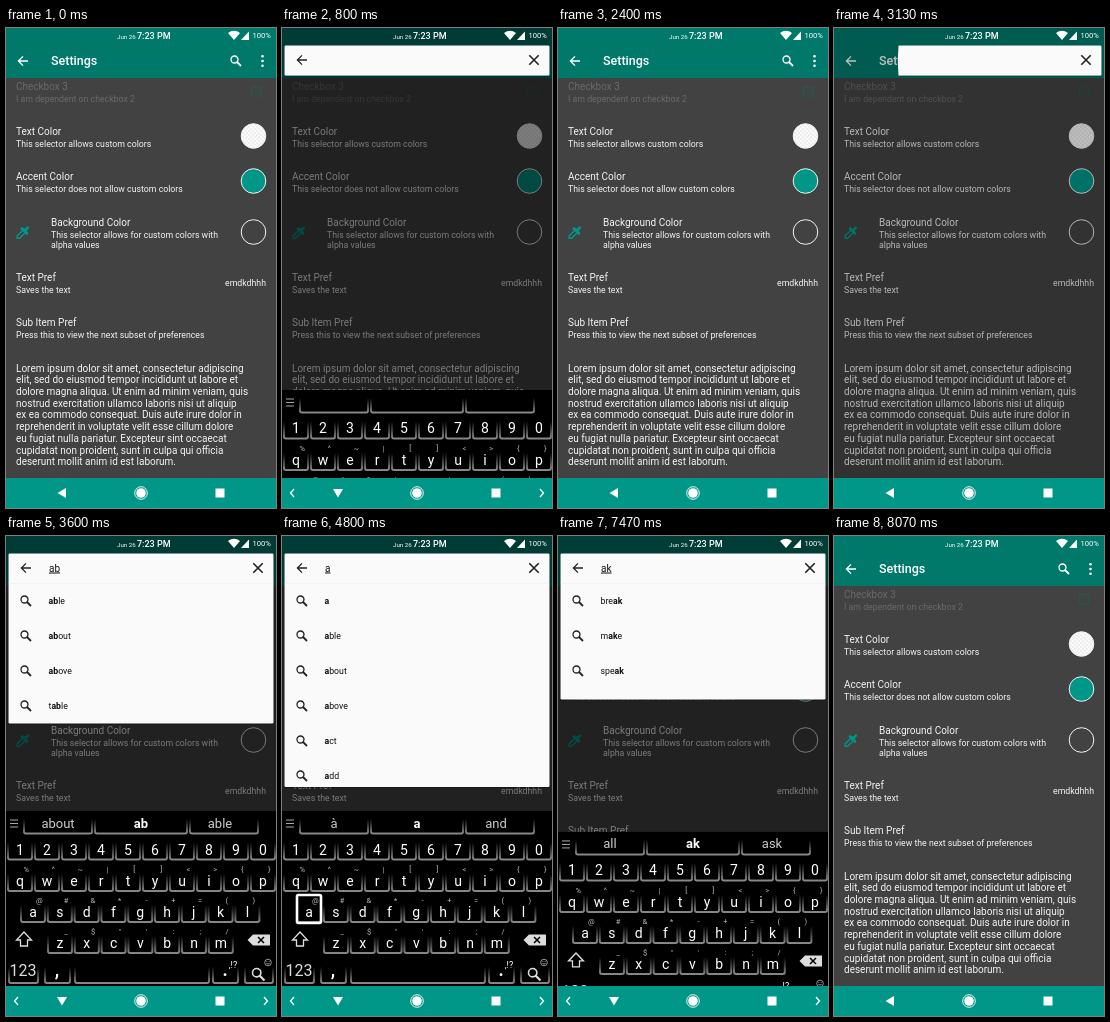
An HTML page that plays this animation: 270x480 px, repeating every 8740 ms.

```html
<!DOCTYPE html>
<html lang="en">
<head>
<meta charset="utf-8">
<title>Settings search</title>
<style>
html, body { margin: 0; width: 100%; height: 100%; overflow: hidden; background: #424242; }
svg { display: block; width: 100%; height: 100%; font-family: Roboto, sans-serif; }
text { white-space: pre; }
.line { fill: none; stroke: currentColor; stroke-width: 1.3; }
</style>
</head>
<body>
<svg id="stage" viewBox="0 0 270 480"></svg>
<script>
const LOOP = 8740, TOP = 17.5, BAR = 30, ROW = 35, MAX_H = 233.5;
const WORDS = ['a', 'able', 'about', 'above', 'act', 'add', 'break', 'make', 'speak', 'table', 'take'];
const HINTS = { '': ['', '', ''], a: ['à', 'a', 'and'], ab: ['about', 'ab', 'able'], aa: ['as', 'aa', 'a'], ak: ['all', 'ak', 'ask'] };
const EDITS = [[1130, 'a'], [1400, 'ab'], [4070, 'a'], [4930, 'aa'], [5600, 'a'], [6470, 'ak']];
const PRESSES = [['a', 1000, 1130], ['b', 1270, 1400], ['a', 4800, 4930], ['k', 6330, 6470]];
const LOREM = ['Lorem ipsum dolor sit amet, consectetur adipiscing', 'elit, sed do eiusmod tempor incididunt ut labore et',
  'dolore magna aliqua. Ut enim ad minim veniam, quis', 'nostrud exercitation ullamco laboris nisi ut aliquip',
  'ex ea commodo consequat. Duis aute irure dolor in', 'reprehenderit in voluptate velit esse cillum dolore',
  'eu fugiat nulla pariatur. Excepteur sint occaecat', 'cupidatat non proident, sunt in culpa qui officia', 'deserunt mollit anim id est laborum.'];

// markup helpers
const text = (x, y, size, str, more = '') => `<text x="${x}" y="${y}" font-size="${size}" ${more}>${str}</text>`;
const rect = (x, y, w, h, fill, more = '') => `<rect x="${x}" y="${y}" width="${w}" height="${h}" fill="${fill}" ${more}/>`;
const path = (d, more = 'class="line"') => `<path d="${d}" ${more}/>`;
const at = (x, y, body, more = '') => `<g transform="translate(${x} ${y})" ${more}>${body}</g>`;
const esc = s => s.replace(/&/g, '&amp;').replace(/</g, '&lt;');
const mid = 'text-anchor="middle"';
const lens = '<circle class="line" cx="-1.5" cy="-1.5" r="3.5"/>' + path('M1 1 5 5', 'class="line" style="stroke-width:1.8"');
const arrow = path('M5 0H-4M0 -4.6 -4.6 0 0 4.6');
const pref = (x, y, title, ...subs) => text(x, y, 10, title) + subs.map((s, i) => text(x, y + 12 + i * 10.2, 8.75, s)).join('');

function settings() {
  const dot = (y, fill) => `<circle cx="247.5" cy="${y}" r="12.3" fill="${fill}" stroke="#f2f2f2"/>`;
  return rect(0, 0, 270, 480, '#424242') +
    `<g fill="#6a6a6a">${pref(10, 62, 'Checkbox 3', 'I am dependent on checkbox 2')}</g>` +
    rect(245.5, 58.5, 9.5, 9.5, 'none', 'stroke="#27584f" stroke-width="1.2"') +
    '<g fill="#f4f4f4">' +
    pref(10, 107, 'Text Color', 'This selector allows custom colors') +
    pref(10, 152, 'Accent Color', 'This selector does not allow custom colors') +
    pref(45, 197.5, 'Background Color', 'This selector allows for custom colors with', 'alpha values') +
    pref(10, 253, 'Text Pref', 'Saves the text') +
    pref(10, 298, 'Sub Item Pref', 'Press this to view the next subset of preferences') +
    text(260, 258, 8.75, 'emdkdhhh', 'text-anchor="end"') +
    LOREM.map((s, i) => text(10, 343.5 + i * 11.72, 10, s)).join('') + '</g>' +
    dot(108, 'url(#checks)') + dot(153, '#009688') + dot(204, 'none') +
    at(17, 204.5, path('M-5.8 5.8V3.4L1 -3.4 3.4 -1 -3.4 5.8Z', 'fill="none" stroke="#009688" stroke-width="1.4"') +
      path('M-1 -4 4 1M1.5 -1.5 4.8 -4.8', 'stroke="#009688" stroke-width="2.6" stroke-linecap="round"')) +
    rect(0, 0, 270, 50, '#00796b') +
    at(17, 33, arrow, 'color="#fff"') + text(45, 37.3, 12.5, 'Settings', 'fill="#fff" font-weight="500"') +
    at(230, 33, lens, 'color="#fff"') + [28.3, 33, 37.7].map(y => `<circle cx="256.5" cy="${y}" r="1.3" fill="#fff"/>`).join('');
}

const statusBar = () => '<g fill="#fff">' + text(111, 11, 6.2, 'Jun 26') + text(131, 11.3, 9, '7:23 PM', 'font-weight="500"') +
  path('M222 5Q228 .5 234 5L228 12Z', '') + path('M235 12H243V3.5Z', '') + text(246.5, 10.3, 7.6, '100%') + '</g>';

const navBar = () => rect(0, 450, 270, 30, '#009688') + '<g fill="#fff">' +
  at(56, 465, path('M-4.5 0 4 -5V5Z', 'id="back"')) +
  '<circle cx="135" cy="465" r="4.8"/><circle cx="135" cy="465" r="6.3" fill="none" stroke="#fff" stroke-width=".9"/>' +
  rect(209.5, 460.5, 9, 9, '#fff') + '</g>' +
  `<g id="sides" color="#fff">${path('M12 461 8.5 465 12 469M258 461 261.5 465 258 469')}</g>`;

function keyboard() {
  const frame = (x, y, w, h) => path(`M${x} ${y}V${y + h - 2}q0 2 2 2h${w - 4}q2 0 2 -2V${y}`, 'fill="none" stroke="url(#glow)" stroke-width="2"');
  const row = (keys, hints, x, y, step) => [...keys].map((k, i) => {
    const cx = x + i * step;
    return frame(cx - 12, y - 18, 24, 23) + text(cx, y, 14, k, mid) +
      (hints ? text(cx + 6.3, y - 14, 7.5, esc(hints[i]), mid + ' fill="#bbb"') : '');
  }).join('');
  return rect(0, 275, 270, 176, '#000') + '<g fill="#fff">' +
    path('M4 284H12M4 287.5H12M4 291H12', 'stroke="#aaa"') +
    frame(18, 278, 68, 19.5) + frame(89, 278, 92, 19.5) + frame(184, 278, 68, 19.5) +
    [52, 135, 214].map((x, i) => text(x, 291.5, 13, '', `${mid} class="hint" fill="${i == 1 ? '#fff' : '#ccc'}" font-weight="${i == 1 ? 700 : 400}"`)).join('') +
    row('1234567890', '', 14, 318.5, 27) + row('qwertyuiop', '%^~|[]<>{}', 14, 350, 27) +
    row('asdfghjkl', '@#&*-+=()', 27, 381, 26.8) + row('zxcvbnm', '_$"\':;/', 54, 412, 26.8) +
    path('M18 396 10.5 404H14.5V410H21.5V404H25.5Z', 'fill="none" stroke="#ddd" stroke-width="1.3"') +
    path('M241.5 404 247 398.5H264V409.5H247Z', 'fill="#ddd"') + path('M252 401 258 407M258 401 252 407', 'stroke="#000" stroke-width="1.5"') +
    text(17, 440, 16, '123', mid + ' fill="#ddd"') + text(51, 440, 18, ',', mid + ' font-weight="700"') +
    frame(3, 425, 29, 22) + frame(39, 425, 25, 22) + frame(69, 425, 134, 22) + frame(207, 425, 25, 22) + frame(239, 425, 28, 22) +
    text(219, 440, 18, '.', mid + ' font-weight="700"') + text(227, 432, 9, ',!?', mid) +
    at(252.5, 438.5, `<g transform="scale(1.2)">${lens}</g>`, 'color="#ddd"') +
    at(262, 426.5, '<circle class="line" r="3.3" style="stroke-width:.8"/>' + path('M-1.6 .8Q0 2.4 1.6 .8M-1.2 -1.4V-.6M1.2 -1.4V-.6', 'class="line" style="stroke-width:.8"'), 'color="#bbb"') +
    '</g>' + rect(-12, 0, 24, 28, 'none', 'id="press" rx="1.5" stroke="#fff" stroke-width="2.6"');
}

stage.innerHTML = `<defs>
  <linearGradient id="glow" x2="0" y2="1"><stop offset=".25" stop-color="#777" stop-opacity="0"/><stop offset="1" stop-color="#888"/></linearGradient>
  <pattern id="checks" width="4" height="4" patternUnits="userSpaceOnUse"><path d="M0 0H4V4H0Z" fill="#fafafa"/><path d="M0 0H2V4H4V2H0Z" fill="#eee"/></pattern>
  <clipPath id="reveal"><circle id="hole" cx="230" cy="33"/></clipPath>
  <clipPath id="sheet"><rect id="sheetBox" x="2.5" y="${TOP}" width="265"/></clipPath></defs>` +
  settings() + rect(0, 0, 270, 480, '#000', 'id="shade"') + statusBar() +
  '<g clip-path="url(#reveal)">' + rect(2, TOP, 266, 0, '#000', 'id="shadow" rx="2" opacity=".35"') +
  rect(2.5, TOP, 265, 0, '#fafafa', 'id="card" rx="1.3"') +
  '<g clip-path="url(#sheet)" color="#222" fill="#111">' + at(20, 32, arrow) +
  path('M247.3 27.3 256.7 36.7M256.7 27.3 247.3 36.7', 'class="line" style="stroke-width:1.6"') +
  text(43, 35.5, 10, '', 'id="query" text-decoration="underline"') + rect(0, 26.5, 1, 12, '#111', 'id="caret"') +
  rect(2.5, 47, 265, .5, '#eaeaea') + '<g id="rows"></g></g></g>' +
  `<g id="kb">${keyboard()}</g>` + navBar();

const $ = id => document.getElementById(id);
const set = (id, name, value) => $(id).setAttribute(name, value);
const show = (id, on) => set(id, 'visibility', on ? 'visible' : 'hidden');

// eased progress from a to b
const ramp = (t, a, b) => {
  const p = Math.min(1, Math.max(0, (t - a) / (b - a)));
  return p * p * (3 - 2 * p);
};
// 0 to 1 and back, twice: each span is [in, in end, out, out end]
const twice = (t, a, b) => [a, b].reduce((s, [i, j, k, l]) => s + ramp(t, i, j) - ramp(t, k, l), 0);
const matches = q => q ? WORDS.filter(w => w.includes(q)) : [];
const listHeight = q => Math.min(MAX_H - BAR, matches(q).length * ROW);

const keyPlace = k => {
  const i = 'asdfghjkl'.indexOf(k);
  return i < 0 ? [54 + 'zxcvbnm'.indexOf(k) * 26.8, 390] : [27 + i * 26.8, 359];
};

let shown = null;
function showQuery(q) {
  if (q === shown) return;
  shown = q;
  $('query').textContent = q;
  set('caret', 'x', 42.4 + $('query').getComputedTextLength());
  $('rows').innerHTML = matches(q).slice(0, 6).map((w, i) => {
    const [head, ...tail] = w.split(q);
    return at(20, 65 + i * ROW, lens) +
      text(42.5, 68 + i * ROW, 8.75, `${head}<tspan font-weight="700">${q}</tspan>${tail.join(q)}`);
  }).join('');
  document.querySelectorAll('.hint').forEach((e, i) => e.textContent = HINTS[q][i]);
}

function draw(t) {
  let query = '', h = 0, edited = -1e4;
  for (const [start, q] of EDITS) {
    if (t < start) break;
    query = q;
    edited = start;
    h += (listHeight(q) - h) * ramp(t, start, start + 270);
  }
  showQuery(query);

  h = BAR + h * (1 - ramp(t, 1800, 2000) + ramp(t, 3270, 3590) - ramp(t, 7400, 7670));
  set('card', 'height', h);
  set('sheetBox', 'height', h);
  set('shadow', 'height', h + 1);
  show('caret', t - edited < 400);

  const open = twice(t, [400, 800, 1870, 2130], [2930, 3330, 7530, 7870]);
  set('hole', 'r', open * 330);
  set('shade', 'opacity', .5 * twice(t, [400, 800, 1800, 2200], [2930, 3330, 7470, 8070]));

  const kb = twice(t, [670, 930, 1800, 2070], [3130, 3470, 7400, 7730]);
  set('kb', 'transform', `translate(0 ${(1 - kb) * 176})`);
  show('sides', kb > .01);
  set('back', 'transform', `rotate(${kb > .01 ? -90 : 0})`);

  const press = PRESSES.find(([, from, to]) => t >= from && t < to);
  show('press', press);
  if (press) set('press', 'transform', `translate(${keyPlace(press[0])})`);
}

function tick() {
  draw(performance.now() % LOOP);
  requestAnimationFrame(tick);
}
tick();
</script>
</body>
</html>
```
